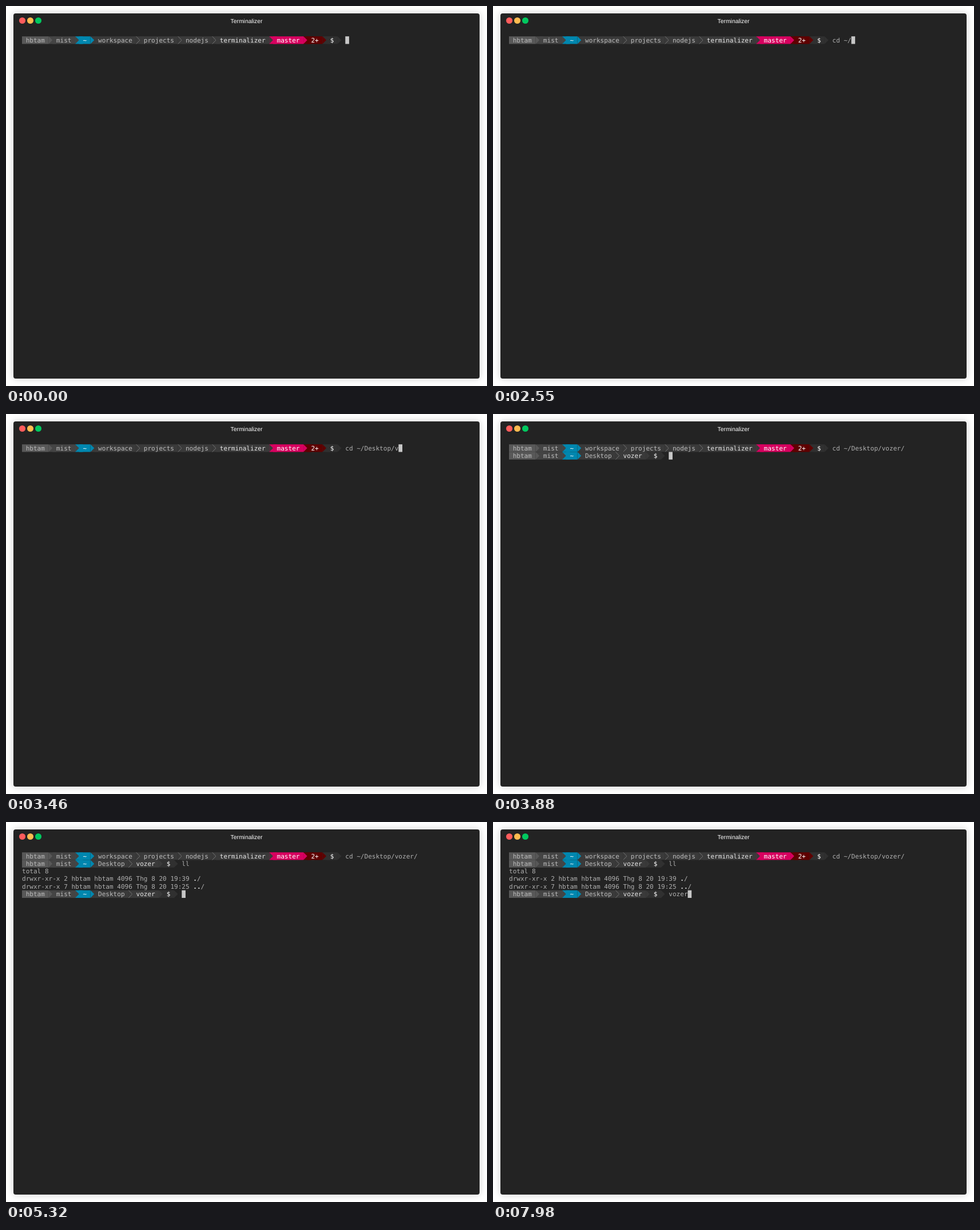
Write an HTML page that moves like this. It is 841x666 px and loops after 8000 ms.

```html
<!DOCTYPE html>
<html lang="en">
<head>
<meta charset="utf-8">
<title>Terminal session</title>
<style>
  html, body { margin: 0; width: 100%; height: 100%; overflow: hidden; background: #fff; }
  #window {
    position: absolute; left: 13px; top: 13px; width: 815px; height: 640px;
    border-radius: 4px; background: #232323; box-shadow: 0 0 13px rgba(0, 0, 0, .2);
  }
  svg { position: absolute; left: 0; top: 0; }
  text { white-space: pre; text-rendering: geometricPrecision; }
  #screen text { font: 11.05px "DejaVu Sans Mono", monospace; }
  #screen .bold { font-weight: bold; }
  #title { font: 10.35px "Liberation Sans", Arial, sans-serif; fill: #fff; text-anchor: middle; }
</style>
</head>
<body>
<div id="window"></div>
<svg width="841" height="666" viewBox="0 0 841 666">
  <circle cx="28.5" cy="25.5" r="5.55" fill="#ff5c5c"/>
  <circle cx="42.5" cy="25.5" r="5.55" fill="#ffbb50"/>
  <circle cx="56.5" cy="25.5" r="5.55" fill="#00c85f"/>
  <text id="title" x="420.5" y="29.5">Terminalizer</text>
  <g id="screen"></g>
  <rect id="cursor" width="6.65" height="13.3" fill="#c7c7c7"/>
</svg>
<script>
const LOOP = 8000;
const CELL_W = 6.65, CELL_H = 13.3, LEFT = 28, TOP = 53.2, BASELINE = 10.3;
const FOREGROUND = '#afafaf', BACKGROUND = '#232323';
const GREY = '#bcbcbc', LIGHT = '#e4e4e4', WHITE = '#fff', PATH = '#3a3a3a';

// Prompt segments: [text, foreground, background]
const user = [
  ['hbtam', GREY, '#585858'],
  ['mist', GREY, '#444'],
  ['~', WHITE, '#0087af'],
];
const status = ['$', WHITE, '#303030'];
const folders = names => names.map((name, i) =>
  [name, i === names.length - 1 ? LIGHT : GREY, PATH]);

const projectPrompt = [
  ...user, ...folders(['workspace', 'projects', 'nodejs', 'terminalizer']),
  ['master', WHITE, '#d7005f'], ['2+', WHITE, '#5f0000'], status,
];
const vozerPrompt = [...user, ...folders(['Desktop', 'vozer']), status];
const bold = boldText => ({ boldText });

// Each step appends its parts to the terminal at the given time.
const steps = [
  [0, projectPrompt],
  [1500, 'c'], [1650, 'd'], [1750, ' '], [1850, '~'],
  [2550, '/'], [2650, 'D'], [2750, 'e'], [2850, 's'],
  [2950, 'k'], [3050, 't'], [3160, 'o'], [3360, 'p/'],
  [3460, 'v'], [3680, 'ozer/'], [3780, '\n'], [3880, vozerPrompt],
  [4580, 'll'], [4920, '\n'],
  [5220, 'total 8', '\n',
    'drwxr-xr-x 2 hbtam hbtam 4096 Thg 8 20 19:39 ', bold('.'), '/', '\n',
    'drwxr-xr-x 7 hbtam hbtam 4096 Thg 8 20 19:25 ', bold('..'), '/', '\n'],
  [5320, vozerPrompt],
  [7320, 'v'], [7670, 'o'], [7820, 'z'], [7980, 'er'],
];

const screen = document.getElementById('screen');
const cursor = document.getElementById('cursor');
let row = 0, col = 0, layer;

const cellX = () => LEFT + col * CELL_W;
const cellY = () => TOP + row * CELL_H;

function add(tag, attributes, parent = layer) {
  const node = document.createElementNS('http://www.w3.org/2000/svg', tag);
  for (const name in attributes) node.setAttribute(name, attributes[name]);
  return parent.appendChild(node);
}

function write(text, fill = FOREGROUND, className = '') {
  add('text', { x: cellX(), y: cellY() + BASELINE, fill, class: className }).textContent = text;
  col += text.length;
}

function fillCells(count, fill) {
  add('rect', { x: cellX(), y: cellY(), width: count * CELL_W, height: CELL_H, fill });
}

// The fill reaches one cell further so that no seam shows before the next segment.
function drawArrow(from, to) {
  const x = cellX(), y = cellY();
  const points = `${x},${y} ${x + CELL_W},${y + CELL_H / 2} ${x},${y + CELL_H}`;
  fillCells(2, to);
  add('polyline', from === to
    ? { points, fill: 'none', stroke: '#808080', 'stroke-width': .8 }
    : { points, fill: from });
  col++;
}

function drawPrompt(segments) {
  segments.forEach(([text, color, background], i) => {
    const next = segments[i + 1];
    fillCells(text.length + 2, background);
    write(` ${text} `, color);
    drawArrow(background, next ? next[2] : BACKGROUND);
  });
  col++;
}

function append(part) {
  if (part === '\n') { row++; col = 0; }
  else if (Array.isArray(part)) drawPrompt(part);
  else if (part.boldText) write(part.boldText, LIGHT, 'bold');
  else write(part);
}

const states = steps.map(([time, ...parts]) => {
  layer = add('g', {}, screen);
  parts.forEach(append);
  return { time, layer, x: cellX(), y: cellY() };
});

let shown = -1;
function render() {
  const time = performance.now() % LOOP;
  const current = states.filter(state => state.time <= time).length - 1;
  if (current !== shown) {
    states.forEach((state, i) => { state.layer.style.display = i <= current ? '' : 'none'; });
    cursor.setAttribute('x', states[current].x);
    cursor.setAttribute('y', states[current].y);
    shown = current;
  }
  requestAnimationFrame(render);
}
render();
</script>
</body>
</html>
```
